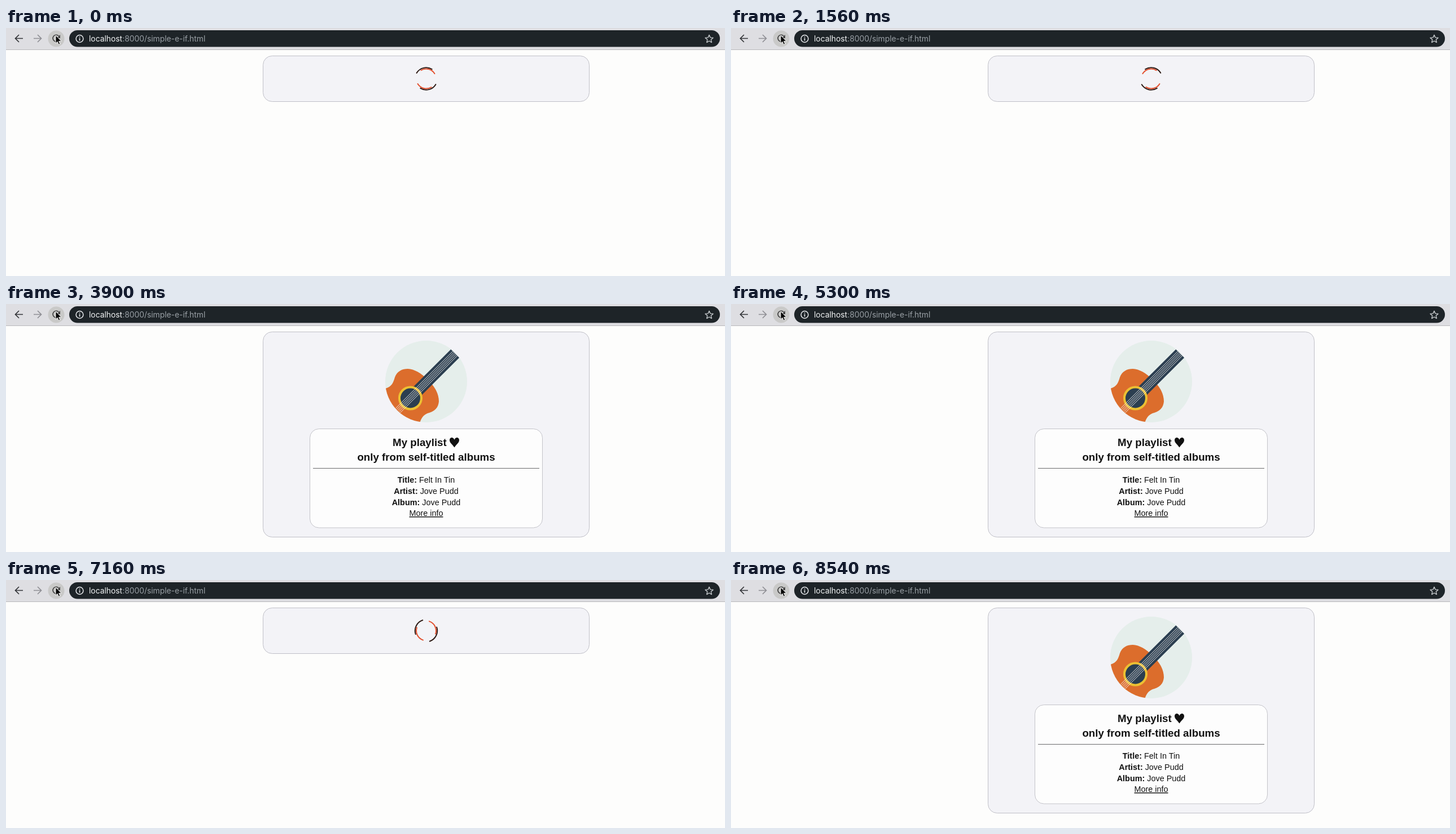
An HTML page that plays this animation: 1274x440 px, repeating every 8560 ms.

```html
<!DOCTYPE html>
<html lang="en">
<head>
<meta charset="utf-8">
<title>Playlist loader</title>
<style>
  html, body { margin: 0; width: 100%; height: 100%; overflow: hidden; background: #fdfdfc; }
  svg { display: block; }
  .line { fill: none; stroke-width: 1.7; }
  .url { font: 13.85px Inter, sans-serif; }
  .card-text { font: 14.4px "Liberation Sans", Arial, sans-serif; fill: #111; text-anchor: middle; }
  .heading { font-size: 18.72px; font-weight: bold; }
  .bold { font-weight: bold; }
  .ring { fill: none; stroke-width: 2; stroke-dasharray: 1; stroke-linecap: round; }
</style>
</head>
<body>
<svg width="1274" height="440" viewBox="0 0 1274 440">
  <defs>
    <clipPath id="disc"><circle cx="744.5" cy="137.5" r="72.5"/></clipPath>
  </defs>

  <!-- browser bar -->
  <rect width="1274" height="38" fill="#dedee2"/>
  <rect y="38" width="1274" height="1" fill="#b8b8bb"/>
  <path class="line" stroke="#333538" d="M30 18.5H17M23 12l-6.5 6.5L23 25"/>
  <path class="line" stroke="#8f8f95" d="M49 18.5H62M56 12l6.5 6.5L56 25"/>
  <circle cx="89" cy="19" r="14.5" fill="#c9c9c8"/>
  <path class="line" stroke="#444" d="M93.5 14.2A6 6 0 1 0 94.8 20"/>
  <path fill="#444" d="M96 12v6h-6z"/>
  <path fill="#000" stroke="#fff" stroke-width=".9" d="M88 13v14.3l3.2-3 2.2 5 2.4-1-2.2-4.9h4.4z"/>
  <rect x="112" y="4" width="1153" height="29.5" rx="14.75" fill="#1e2428"/>
  <circle cx="130.5" cy="19" r="6.4" fill="none" stroke="#e8eaed" stroke-width="1.5"/>
  <path stroke="#e8eaed" stroke-width="1.6" d="M130.5 18v4.4M130.5 15.2v1.6"/>
  <text class="url" x="147" y="24" fill="#9aa0a6"><tspan fill="#f1f3f4">localhost</tspan>:8000/simple-e-if.html</text>
  <path fill="none" stroke="#c3c7ca" stroke-width="1.4" stroke-linejoin="round"
    d="M1246 12.3l2 4.6 5 .5-3.8 3.3 1.1 4.9-4.3-2.6-4.3 2.6 1.1-4.9-3.8-3.3 5-.5z"/>

  <rect id="panel" x="455.5" y="49.5" width="578" height="81" rx="16" fill="#f3f3f7" stroke="#bfbfc7"/>

  <g id="spinner">
    <circle id="outer" class="ring" cx="744.5" cy="90" r="19.7" pathLength="4" stroke="#2e1c17"/>
    <circle id="inner" class="ring" cx="744.5" cy="90" r="17.5" pathLength="4" stroke="#e2502f" stroke-dashoffset="1"/>
  </g>

  <g id="card">
    <g clip-path="url(#disc)">
      <rect x="672" y="65" width="145" height="145" fill="#e5eeeb"/>
      <path fill="#dc6d2c" d="M670 150.500C684 147 686 140 689 130C693 119 702 115 712 115C724 116 734 121 749 136
        C761 148 767 160 767 173C766 184 760 190 750 193C742 195 736 200 733 212L660 215Z"/>
      <g transform="translate(716.500 167) rotate(-45)">
        <rect x="15" y="-10.500" width="97" height="21" fill="#2b3e50"/>
        <circle r="19.500" fill="#2b3e50" stroke="#ecc033" stroke-width="4"/>
        <path fill="none" stroke="#f4f1ee" stroke-width=".9"
          d="M-31-5.600H112M-31-2.800H112M-31 0H112M-31 2.800H112M-31 5.600H112"/>
      </g>
    </g>
    <rect x="538.500" y="221.500" width="412" height="175.500" rx="16" fill="#fdfdfd" stroke="#c3c3c9"/>
    <g class="card-text">
      <text class="heading" x="732.900" y="252">My playlist</text>
      <text class="heading" x="744.500" y="278">only from self-titled albums</text>
      <text x="744.500" y="317"><tspan class="bold">Title:</tspan> Felt In Tin</text>
      <text x="744.500" y="336.500"><tspan class="bold">Artist:</tspan> Jove Pudd</text>
      <text x="744.500" y="356.500"><tspan class="bold">Album:</tspan> Jove Pudd</text>
      <text x="744.500" y="376" text-decoration="underline">More info</text>
    </g>
    <path fill="#111" d="M794.500 254.500C790 248 786 246 786 241.500C786 235.500 793 235.500 794.500 241
      C796 235.500 803 235.500 803 241.500C803 246 799 248 794.500 254.500Z"/>
    <path stroke="#68686a" d="M544 291.500H945"/>
  </g>
</svg>
<script>
  const LOOP = 8560;
  const FIRST_CARD = 37, RELOAD = 127, SECOND_CARD = 168;
  const $ = id => document.getElementById(id);

  // Steps come in groups of three lasting 20, 100 and 20 ms.
  function stepAt(time) {
    const rest = time % 140;
    return Math.floor(time / 140) * 3 + (rest >= 20) + (rest >= 120);
  }

  function spin(id, angle) {
    $(id).setAttribute("transform", `rotate(${angle} 744.5 90)`);
  }

  function draw(now) {
    const step = stepAt(now % LOOP);
    const loading = step < FIRST_CARD || (step >= RELOAD && step < SECOND_CARD);
    const angle = step < RELOAD ? 31 + 6.1 * step : 6.5 * (step - 129) - 1;

    $("panel").setAttribute("height", loading ? 81 : 364);
    $("spinner").style.display = loading ? "" : "none";
    $("card").style.display = loading ? "none" : "";
    spin("outer", angle);
    spin("inner", -angle);
    requestAnimationFrame(draw);
  }

  draw(0);
</script>
</body>
</html>
```
